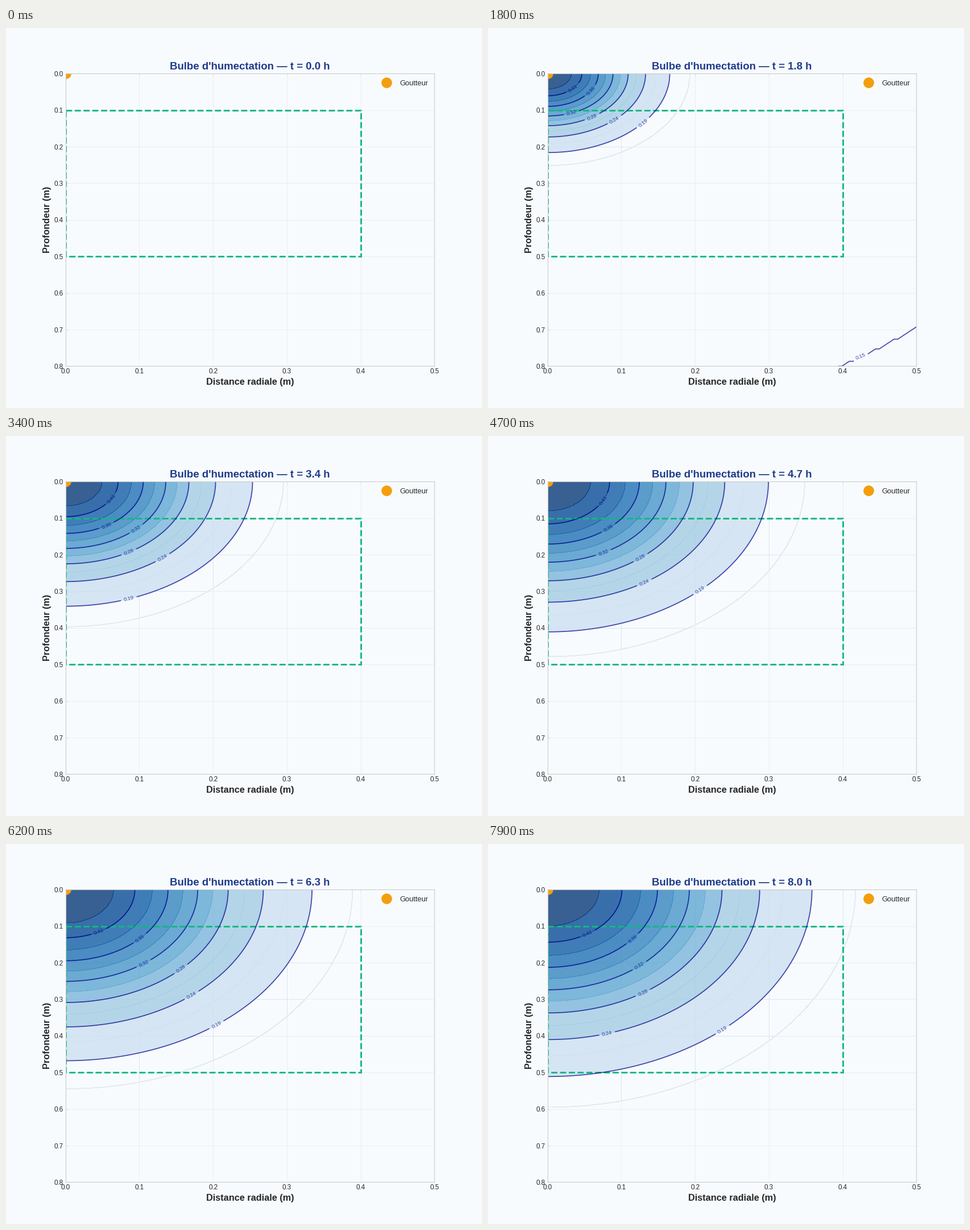
A matplotlib script that plays this animation: 837 px wide and 669 px high, repeating every 8000 ms.

```python
import numpy as np
import matplotlib.pyplot as plt
from matplotlib.animation import FuncAnimation
from matplotlib.patches import Ellipse, Rectangle

DPI = 83.7
FRAMES, INTERVAL = 80, 100
HOURS = np.linspace(0, 12, 120)
BG, NAVY, GREEN, AMBER = "#f8fbfe", "#1e3a8a", "#10b981", "#f59e0b"
DRY, WET = 0.15, 0.45
FILLS = np.linspace(DRY, WET, 15)
LINES = np.linspace(DRY, WET, 8)

plt.rcParams.update({
    "font.family": "Liberation Sans",
    "text.color": "0.15",
    "axes.labelcolor": "0.15",
    "xtick.labelcolor": "0.15",
    "ytick.labelcolor": "0.15",
    "axes.edgecolor": "0.8",
    "axes.linewidth": 1,
    "axes.axisbelow": True,
    "legend.frameon": False,
})

R, Z = np.meshgrid(np.linspace(0, 0.5, 100), np.linspace(0, 0.8, 120))

# The pale bands share one tint per pair
BLUES = plt.cm.Blues((np.arange(2, 14) + 0.5) / 14)
for k in (0, 2):
    BLUES[k:k + 2] = BLUES[k:k + 2].mean(axis=0)

fig, ax = plt.subplots(figsize=(837.001 / DPI, 669.001 / DPI), dpi=DPI,
                       facecolor=BG)
ax.set(facecolor=BG, xlim=(0, 0.5), ylim=(0.8, 0))
ax.set_xticks(np.arange(6) / 10)
ax.set_yticks(np.arange(9) / 10)
ax.tick_params(direction="in", length=4, width=0.6, color="#d3d9dc",
               pad=3.5, labelsize=10, top=True, bottom=False)
ax.grid(color="0.8", alpha=0.3, lw=0.8)
ax.set_xlabel("Distance radiale (m)", fontsize=14, weight="bold")
ax.set_ylabel("Profondeur (m)", fontsize=14, weight="bold")
title = ax.set_title("", fontsize=16, weight="bold", color=NAVY)

ax.add_patch(Rectangle((0, 0.1), 0.4, 0.4, fill=False, ec=GREEN, lw=2.5,
                       ls="--", zorder=1.3))
ax.plot(0, 0, "o", color=AMBER, ms=15, ls="none", label="Goutteur", zorder=2.2)
ax.legend(loc="upper right", fontsize=11)

# Outer wetting front, with the grid tinted inside it
front = ax.add_patch(Ellipse((0, 0), 0, 0, fill=False, ec="#e3ebf0", lw=0.8,
                             aa=False, zorder=1.1))
tinted = [ax.axvline(x / 10, color="#d7e6f4", lw=0.8, zorder=0.8)
          for x in range(1, 5)]
tinted += [ax.axhline(z / 10, color="#d7e6f4", lw=0.8, zorder=0.8)
           for z in range(1, 8)]
bulb = []


def spread(t):
    return 0.2 * (1 - np.exp(-0.3 * t)), 0.3 * (1 - np.exp(-0.25 * t))


def clear_bulb():
    for cs in bulb:
        cs.remove()
    bulb.clear()
    for label in list(ax.texts):
        label.remove()


def draw(i):
    t = HOURS[i]
    clear_bulb()
    title.set_text(f"Bulbe d'humectation — t = {t:.1f} h")
    for artist in [front, *tinted]:
        artist.set_visible(i > 0)
    if i == 0:
        return

    sr, sz = spread(t)
    reach = np.sqrt(2 * np.log((WET - DRY) / (FILLS[1] - DRY)))
    front.set(width=2 * reach * sr, height=2 * reach * sz)
    for line in tinted:
        line.set_clip_path(front)

    theta = DRY + (WET - DRY) * np.exp(-(R**2 / (2 * sr**2) + Z**2 / (2 * sz**2)))
    bulb.append(ax.contourf(R, Z, theta, levels=FILLS[2:], colors=BLUES, alpha=0.8))
    cs = ax.contour(R, Z, theta, levels=LINES, colors="darkblue",
                    linewidths=1.5, alpha=0.7)
    ax.clabel(cs, inline=True, fontsize=8, fmt="%.2f")
    bulb.append(cs)


anim = FuncAnimation(fig, draw, frames=FRAMES, init_func=lambda: draw(0),
                     interval=INTERVAL, repeat=True, repeat_delay=0, blit=False)
plt.show()
```
